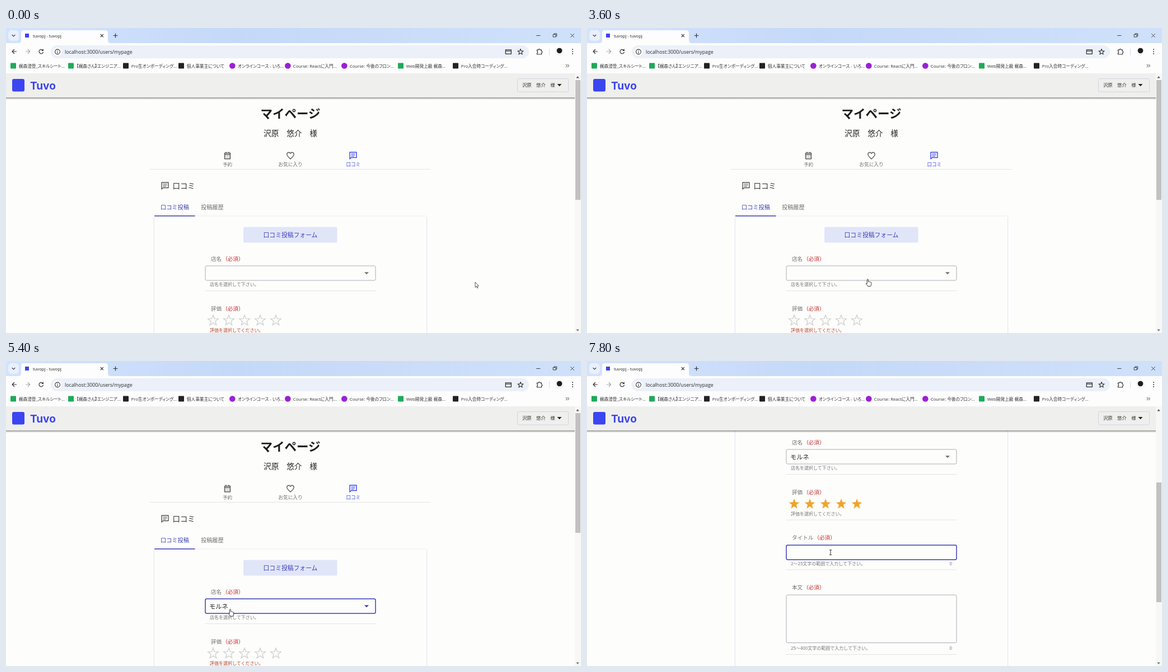
These frames come from a looping animation (1027x545 px, 8 s). An HTML page:

```html
<!DOCTYPE html>
<html lang="ja">
<head>
<meta charset="utf-8">
<title>tuvopj</title>
<style>
  html, body { margin: 0; width: 100%; height: 100%; overflow: hidden; background: #fdfdfc; }
  svg { display: block; width: 100vw; height: 100vh; }
  text { font-family: "Noto Sans CJK JP", "Noto Sans CJK", sans-serif; white-space: pre; }
  .ui { font-family: "Open Sans", "Noto Sans CJK JP", "Noto Sans CJK", sans-serif; font-feature-settings: "palt"; }
  .logo { font-family: Inter, sans-serif; font-weight: 700; }
  .line { fill: none; stroke-linecap: round; stroke-linejoin: round; }
</style>
</head>
<body>
<svg id="stage" viewBox="0 0 1027 545" preserveAspectRatio="none">
  <defs>
    <linearGradient id="strip">
      <stop offset="0" stop-color="#d3e3fd"/><stop offset=".4" stop-color="#c4d9f8"/><stop offset="1" stop-color="#cfe1fa"/>
    </linearGradient>
    <linearGradient id="fade" x2="0" y2="1">
      <stop offset="0" stop-color="#000" stop-opacity=".42"/><stop offset="1" stop-color="#000" stop-opacity="0"/>
    </linearGradient>
    <filter id="lift" x="-10%" y="-40%" width="120%" height="200%">
      <feDropShadow dx="0" dy="2.5" stdDeviation="3" flood-color="#202030" flood-opacity=".5"/>
    </filter>
    <filter id="soft" x="-5%" y="-5%" width="110%" height="110%">
      <feDropShadow dx="0" dy=".6" stdDeviation="1" flood-color="#5058b0" flood-opacity=".4"/>
    </filter>
  </defs>
</svg>
<script>
const LOOP = 8000, STEP = 200, SCROLL = 267;
const BLUE = '#3b45f0', INK = '#3a3fb8', GREY = '#6f6f6f', RED = '#c62f2f', RULE = '#e4e4e2';
const USER = '沢原　悠介　様', SHOP = 'モルネ';
const starX = [370, 398, 426, 454, 482];

// y is the middle of the line
const text = (s, x, y, size, fill = '#333', more = '') =>
  `<text x="${x}" y="${y + size * 0.37}" font-size="${size}" fill="${fill}" ${more}>${s}</text>`;
const mid = 'text-anchor="middle"', end = 'text-anchor="end"', ui = 'class="ui"';
const rect = (x, y, w, h, fill, r = 0, more = '') =>
  `<rect x="${x}" y="${y}" width="${w}" height="${h}" rx="${r}" fill="${fill}" ${more}/>`;
const line = (d, color, w = 1, more = '') =>
  `<path class="line" d="${d}" stroke="${color}" stroke-width="${w}" ${more}/>`;
const disc = (x, y, r, fill) => `<circle cx="${x}" cy="${y}" r="${r}" fill="${fill}"/>`;
const shape = (d, fill, more = '') => `<path d="${d}" fill="${fill}" ${more}/>`;
const group = (id, body, more = '') => `<g id="${id}" ${more}>${body}</g>`;
const rule = y => line(`M356 ${y}H660`, RULE);

function star(cx, cy, R = 9.8) {
  const pts = Array.from({ length: 10 }, (_, i) => {
    const r = i % 2 ? R * 0.42 : R, a = i * Math.PI / 5 - Math.PI / 2;
    return (cx + r * Math.cos(a)).toFixed(2) + ' ' + (cy + r * Math.sin(a)).toFixed(2);
  });
  return `M${pts.join('L')}Z`;
}

const bubble = (x, y, c) =>
  line(`M${x - 6} ${y + 6}V${y - 6}H${x + 6}V${y + 3.5}H${x - 3.5}Z`, c, 1.4) +
  line(`M${x - 3.3} ${y - 3.2}H${x + 3.3}M${x - 3.3} ${y - 1}H${x + 3.3}M${x - 3.3} ${y + 1.2}H${x + 1.5}`, c, .9);

function label(s, y) {
  const size = 9.6;
  return text(s, 366, y, size, GREY) + text('（必須）', 367 + s.length * size, y, size, RED);
}
const field = (id, y, h) => rect(356, y, 304, h, 'none', 2.5, `id="${id}" stroke="#adadb6"`);
const helper = (s, y, more = '') => text(s, 364, y, 8, '#777', more);
const count = y => text('0', 652, y, 8, '#777', end);

function page() {
  const cal = line('M390.5 223.5H400.5V233.7H390.5ZM390.5 226H400.5M393 221.7V223M398 221.7V223', '#555', 1.4) +
    line('M392.8 228.6H398.6M392.8 231.2H398.6', '#555', 1.3, 'stroke-dasharray=".1 2.7"');
  const heart = line('M508 234C504 230.5 501.8 228.4 501.8 225.8C501.8 221.6 506.3 221.2 508 224.2C509.7 221.2 514.2 221.6 514.2 225.8C514.2 228.4 512 230.5 508 234Z', '#555', 1.3);
  return text('マイページ', 508, 153.5, 21.5, '#1c1c1c', mid + ' font-weight="700"') +
    text(USER, 508, 188, 13.7, '#222', mid + ' font-weight="300"') +
    cal + heart + bubble(620, 228, BLUE) +
    text('予約', 395.5, 243.5, 8.5, GREY, mid) +
    text('お気に入り', 508, 243.5, 8.7, GREY, mid) +
    text('口コミ', 620.3, 243.5, 8.6, BLUE, mid) +
    line('M257 252.5H758', RULE) +
    bubble(284, 282, '#555') + text('口コミ', 297.5, 282, 13.4, '#333', 'font-weight="300"') +
    rect(265, 336.5, 486, 560, '#fdfdfc', 2, 'filter="url(#soft)"') +
    text('口コミ投稿', 276, 320, 10.2, INK) + text('投稿履歴', 348, 320, 10.2, GREY) +
    rect(265, 335, 72.5, 1.5, INK) +
    rect(424, 355.5, 167.5, 28, '#e1e5f8', 2.5) +
    text('口コミ投稿フォーム', 508, 370, 10.8, INK, mid) +

    label('店名', 412) + field('shop', 425, 26) +
    text(SHOP, 363, 438.5, 11.2, '#222', 'id="picked"') +
    shape('M640 436.3H648L644 440.3Z', '#707070', 'id="caret"') +
    helper('店名を選択して下さい。', 458) + rule(469.5) +

    label('評価', 501) + starX.map(x => shape(star(x, 522.7), 'none', 'class="star" stroke-width="1.4"')).join('') +
    helper('評価を選択してください。', 540, 'id="hint"') + rule(551) +

    label('タイトル', 582.5) + field('title', 596, 26) +
    helper('2〜25文字の範囲で入力して下さい。', 629) + count(629) + rule(640) +

    label('本文', 671.5) + field('body', 685, 85.5) +
    helper('25〜400文字の範囲で入力して下さい。', 780) + count(780) + rule(791.5);
}

const menu = () => rect(356, 424.5, 304, 37.5, '#fdfdfd', 2.5, 'filter="url(#lift)"') +
  rect(356, 430, 304, 26.5, '#f5f5f6') + text(SHOP, 366, 442.5, 9.2, '#333');

const header = () => rect(0, 124, 1016, 4, 'url(#fade)') + rect(0, 80, 1016, 44, '#efefee') +
  rect(11, 91, 22, 22.5, BLUE, 3) +
  `<text class="logo" x="43" y="109.5" font-size="19" fill="${BLUE}">Tuvo</text>` +
  rect(913.5, 90.5, 91, 23.5, 'none', 2, 'stroke="#d3d4e2"') +
  text(USER, 922, 102, 8.4, '#333') + shape('M984.5 100H992.5L988.5 104.2Z', '#222');

const scrollbar = () => rect(1016, 81, 11, 464, '#f7f7f6') +
  shape('M1018.3 89.5H1023.7L1021 86Z', '#555') + shape('M1018.3 538.5H1023.7L1021 542Z', '#777') +
  rect(1017, 93, 9, 214, '#c1c1c1', 0, 'id="thumb"');

function bookmarks() {
  const green = '#1faa59', black = '#222', purple = '#9b1fd8';
  const items = [
    [8, green, '梶森澄登_スキルシート...'], [111, green, '【梶森さん】エンジニア...'],
    [209, black, 'Pro生オンボーディング...'], [308, black, '個人事業主について'],
    [399, purple, 'オンラインコース - いろ...'], [498, purple, 'Course: Reactに入門...'],
    [599, purple, 'Course: 今後のフロン...'], [700, green, 'Web開発上級 梶森...'],
    [798, black, 'Pro入会時コーディング...']
  ];
  return items.map(([x, c, s]) =>
    (c === purple ? disc(x + 5.3, 67.5, 5.3, c) : rect(x, 62.5, 10, 10, c, 1)) +
    text(s, x + 14.8, 68, 7.7, '#333', ui)).join('');
}

function browser() {
  const dark = '#333', w = 1.2;
  return rect(0, 0, 1027, 28, 'url(#strip)') + rect(0, 27, 1027, 54, '#fdfdfd') +
    rect(4, 4, 19, 19, '#e8f0fd', 6) + line('M11 12.3L13.5 14.8L16 12.3', dark, w) +
    shape('M22 27Q27 27 27 22V9Q27 4 32 4H177Q182 4 182 9V22Q182 27 187 27Z', '#fdfdfd') +
    rect(34, 10, 7, 7, BLUE) + text('tuvopj - tuvopj', 48, 13.7, 7.6, '#222', ui) +
    line('M169 11.3L173.5 15.8M173.5 11.3L169 15.8', dark, w) +
    line('M192 13.5H199M195.5 10V17', dark, w) +
    line('M947.5 13.5H954', dark, .9) +
    line('M977.5 11.5H982V16H977.5ZM979 11.3V10H983.7V14.6H982.3', dark, .9) +
    line('M1008.5 10.5L1014.5 16.5M1014.5 10.5L1008.5 16.5', dark, .9) +
    line('M18.5 42H11.3M14.6 38.5L11.1 42L14.6 45.5', dark, w) +
    line('M35.3 42H42.5M39.2 38.5L42.7 42L39.2 45.5', '#aaa', w) +
    line('M65.8 40A3.7 3.7 0 1 0 66.3 43.2M66.3 38.2V40.5H64', dark, w) +
    rect(80, 31, 854, 23, '#ebf0f9', 11.5) + disc(92, 42.5, 7.8, '#fdfdfd') +
    line('M87.6 42.5a4.4 4.4 0 1 0 8.8 0a4.4 4.4 0 1 0 -8.8 0M92 42.3V44.8M92 40.3V40.4', dark, 1.1) +
    text('localhost:3000/users/mypage', 105, 42.5, 8.8, '#2a2a2a', ui) +
    line('M892.3 38.8H902.3V46.3H892.3ZM892.3 41.2H902.3', dark, 1.3) +
    line(star(919, 42.8, 5.3), dark, 1.1) +
    line('M948.5 39.2H951A1.6 1.6 0 0 1 954.2 39.2H956.5V41.5A1.6 1.6 0 0 1 956.5 44.6V47H948.5V44.6A1.6 1.6 0 0 0 948.5 41.5Z', dark, w) +
    line('M970.5 37V48', '#d3e0f5', 1.2) +
    disc(988.5, 42, 7.5, '#f4f4f4') + disc(988.5, 40.5, 4.8, '#1d1d1d') +
    [38.3, 42.2, 46.1].map(y => disc(1012, y, 1, dark)).join('') +
    bookmarks() + line('M1000 65.2L1002.3 67.5L1000 69.8M1003.3 65.2L1005.6 67.5L1003.3 69.8', dark, 1);
}

const pointers = {
  arrow: shape('M0 0V9.5L2.1 7.6L3.6 10.8L5 10.2L3.6 7H6.3Z', '#fff', 'stroke="#333" stroke-width=".8" stroke-linejoin="round"'),
  hand: shape('M-1.2 6.2V1A1 1 0 0 1 .9 1V4.4Q2.2 3.6 2.8 4.7Q4.2 4.1 4.6 5.2Q6.2 4.9 6.2 6.4V8.6Q6.2 11 5 12.5H.2Q-1 10.4 -3 8.2Q-3.3 6.6 -1.2 7.6Z', '#fff', 'stroke="#222" stroke-width=".9" stroke-linejoin="round"'),
  beam: line('M-1.8 -4.3H1.8M-1.8 4.3H1.8M0 -4.3V4.3', '#333', 1)
};

const stage = document.getElementById('stage');
stage.insertAdjacentHTML('beforeend',
  group('page', page()) + group('menu', menu()) + header() + scrollbar() + browser() +
  Object.entries(pointers).map(([id, body]) => group(id, body)).join(''));
const $ = id => document.getElementById(id);
const set = (el, attrs) => { for (const k in attrs) el.setAttribute(k, attrs[k]); };
const show = (id, on) => set($(id), { display: on ? 'inline' : 'none' });
const stars = [...document.querySelectorAll('.star')];

// time, x, y of the pointer
const path = [
  [200, 838, 454], [1200, 800, 468], [1400, 800, 468], [2200, 770, 472], [3600, 501.5, 449],
  [4400, 482.5, 439], [5200, 400.5, 443.5], [5400, 400.5, 443.5], [5800, 421, 439],
  [6400, 482, 258], [7000, 483, 257], [7600, 435, 342]
];
function pointerAt(t) {
  const i = path.findIndex(p => p[0] > t);
  if (i < 0) return path[path.length - 1].slice(1);
  if (i === 0) return path[0].slice(1);
  const a = path[i - 1], b = path[i];
  const u = (t - a[0]) / (b[0] - a[0]), e = u * u * (3 - 2 * u);
  return [a[1] + (b[1] - a[1]) * e, a[2] + (b[2] - a[2]) * e];
}

function hit(x, y) {
  if (x > 360 && x < 493 && y > 511 && y < 533) return 'stars';
  if (x < 356 || x > 660) return '';
  if (y > 425 && y < 451) return 'shop';
  if (y > 596 && y < 622) return 'title';
  if (y > 685 && y < 770) return 'body';
  return '';
}

function draw(now) {
  const t = Math.floor((now % LOOP) / STEP) * STEP;
  const scroll = SCROLL * Math.min(1, Math.max(0, (t - 5400) / 400));
  const [x, y] = pointerAt(t);
  const over = hit(x, y + scroll);
  const picked = t >= 5200, rated = t >= 6800;
  const focus = t >= 7600 ? 'title' : t >= 4000 && !rated ? 'shop' : '';

  set($('page'), { transform: `translate(0 ${-scroll})` });
  set($('thumb'), { y: 93 + scroll * 124 / SCROLL });
  show('menu', t >= 4200 && !picked);
  show('picked', picked);

  for (const id of ['shop', 'title', 'body']) {
    const on = focus === id, dark = over === id && id !== 'shop';
    set($(id), { stroke: on ? INK : dark ? '#444' : '#adadb6', 'stroke-width': on ? 1.5 : 1 });
  }
  set($('caret'), { fill: focus === 'shop' ? INK : '#707070' });

  const lit = rated ? 5 : over === 'stars' ? Math.ceil((x - 356) / 28) : 0;
  stars.forEach((s, i) => set(s, i < lit
    ? { fill: '#f2a32b', stroke: 'none' } : { fill: 'none', stroke: '#d2d2d2' }));
  set($('hint'), { fill: rated ? '#777' : '#b5452f' });

  const kind = over === 'shop' || over === 'stars' ? 'hand' : over ? 'beam' : 'arrow';
  for (const id in pointers) show(id, id === kind);
  set($(kind), { transform: `translate(${x} ${y})` });
}

const start = performance.now();
function tick() {
  draw(performance.now() - start);
  requestAnimationFrame(tick);
}
tick();
</script>
</body>
</html>
```
